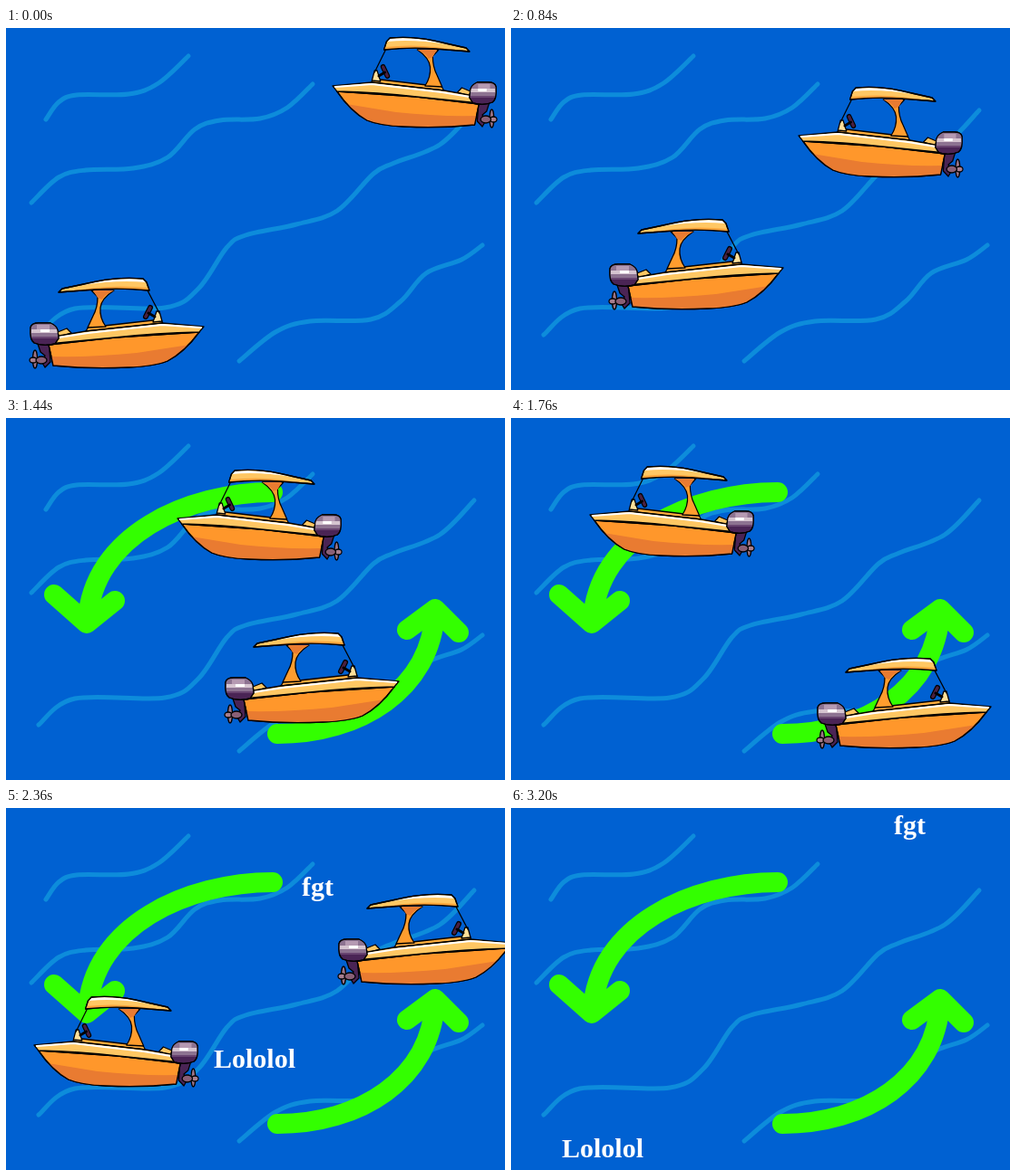
Recreate the animation shown at these times as an HTML page with a canvas. Size 550 by 400 pixels, loop 3.24 s.

```html
<!DOCTYPE html>
<html lang="en">
<head>
<meta charset="utf-8">
<title>Two boats</title>
<style>
html, body { margin: 0; width: 100%; height: 100%; overflow: hidden; background: #0061d2; }
canvas { display: block; width: 550px; height: 400px; }
</style>
</head>
<body>
<canvas id="stage" width="550" height="400"></canvas>
<script>
const ctx = document.getElementById('stage').getContext('2d');
const LOOP = 3240, STEP = 40;

const waves = [
  [44,101, 58,82, 78,74, 135,73, 168,61, 201,31],
  [28,193, 58,165, 88,157, 140,155, 178,143, 208,112, 236,102, 280,100, 310,88, 338,62],
  [36,339, 76,310, 175,309, 212,288, 243,243, 264,229, 320,217, 365,202, 405,161, 428,149, 478,129, 516,91],
  [257,368, 297,336, 335,324, 402,322, 435,302, 463,271, 502,256, 525,240]
];

// Offsets from the starting place: [time, x, y]
const rightPath = [
  [0,0,0], [1120,109,-87], [1600,267,-17], [1680,290,-12], [1760,311,-11],
  [1880,321,-41], [2120,320,-123], [2240,331,-157], [2600,375,-264],
  [2760,394,-312], [3200,448,-442]
];
const leftPath = [
  [0,0,0], [1120,-58,73], [1600,-226,36], [1680,-250,37], [1760,-273,43],
  [1920,-304,89], [2120,-320,153], [2240,-324,181], [2600,-349,256],
  [2760,-362,294], [3200,-402,425]
];

const hullLow = new Path2D('M47 350 L52 373 Q92 377 134 375 Q163 374 178 368 Q197 358 213 336 L120 342 Z');
const hullShade = new Path2D('M50 363 Q95 364 144 359 L202 350 Q191 362 177 368 Q163 374 134 375 Q92 377 52 373 Z');
const rim = new Path2D('M47 349 L53 341 L88 335 L172 326 L218 330 L213 336 Q165 337 120 342 Z');
const coaming = new Path2D('M88 335 L91 330 L108 329 L171 322 L173 327 Z');
const pillar = new Path2D('M94 290 L101 297 Q101 309 96 318 L90 331 L110 330 Q103 320 104 309 Q105 299 119 290 Z');
const pillarShade = new Path2D('M96 290 L119 290 Q108 295 106 300 L101 298 Z');
const roof = new Path2D('M58 292 L62 288 L100 280 Q124 275 151 277 L155 281 L158 290 Q128 287 97 289 Z');
const roofGlow = new Path2D('M84 284 Q121 275 151 278 L154 281 Q124 278 84 284 Z');
const roofEdge = new Path2D('M59 292 L98 287 Q126 284 157 287 L158 290 Q128 287 97 289 Z');
const cowl = new Path2D('M27 331 Q28 326 36 326 L49 326 Q56 329 57 334 L58 343 L54 349 Q41 352 31 348 Q26 345 27 331 Z');
const leg = new Path2D('M35 349 L52 348 L48 357 L49 369 L43 375 L40 370 L43 362 L38 358 Z');

function fill(shape, color, line = true) {
  ctx.fillStyle = color;
  ctx.fill(shape);
  if (line) ctx.stroke(shape);
}

function stroke(d, color, width) {
  ctx.strokeStyle = color;
  ctx.lineWidth = width;
  ctx.stroke(new Path2D(d));
}

function box(x, y, w, h, color) {
  ctx.fillStyle = color;
  ctx.fillRect(x, y, w, h);
}

function oval(x, y, rx, ry, color) {
  const p = new Path2D();
  p.ellipse(x, y, rx, ry, 0, 0, Math.PI * 2);
  fill(p, color);
}

// Drawn facing right, where it begins at the lower left
function boat() {
  ctx.lineJoin = ctx.lineCap = 'round';
  ctx.strokeStyle = '#000';
  ctx.lineWidth = 1.3;
  fill(new Path2D('M57 336 L67 332 L72 337 L58 341 Z'), '#ffc763');
  fill(leg, '#4a2455');
  oval(32, 366, 2.5, 10, '#9c7486');
  oval(30, 367, 4, 3, '#a87f8e');
  oval(39, 367, 6, 4, '#8a6076');

  fill(hullLow, '#ff972b');
  fill(hullShade, '#e97b31', false);
  ctx.stroke(hullLow);
  fill(coaming, '#ffad3d');
  fill(rim, '#ffc763');
  stroke('M58 342 L90 337 L172 328 L215 331', '#fff', 2);
  stroke('M88 335 L172 326', '#000', 1.2);

  ctx.lineWidth = 1.3;
  fill(pillar, '#ff9d2e');
  fill(pillarShade, '#e97b31', false);
  fill(new Path2D('M162 325 L166 313 L169 313 L172 324 Z'), '#ffe09a');
  stroke('M156 290 L169 315', '#000', 1.3);
  ctx.lineWidth = 1.3;
  fill(roof, '#ffc763');
  fill(roofEdge, '#ffa53a', false);
  fill(roofGlow, '#fff', false);
  ctx.stroke(roof);

  stroke('M154 319 L159 309', '#000', 6);
  stroke('M154 319 L159 309', '#4a2040', 3.5);
  stroke('M157 315 L164 319', '#000', 3);

  ctx.strokeStyle = '#000';
  ctx.lineWidth = 1.3;
  fill(cowl, '#4a2455');
  ctx.save();
  ctx.clip(cowl);
  box(26, 326, 32, 15, '#8d7391');
  box(28, 333, 29, 4, '#d5c4d0');
  box(34, 328, 14, 5, '#b59ab2');
  box(38, 333, 10, 3, '#fff');
  box(26, 341, 32, 2, '#684470');
  ctx.restore();
  ctx.stroke(cowl);
}

// Smooth run through keyed points, with tangents taken from the neighbours
function along(path, t) {
  let i = 0;
  while (i < path.length - 2 && t >= path[i + 1][0]) i++;
  const a = path[i], b = path[i + 1], d = b[0] - a[0], u = (t - a[0]) / d;
  if (i === 0) return [1, 2].map(k => Math.round(b[k] * u));
  const p = i > 1 ? path[i - 1] : a, n = path[i + 2] || b;
  return [1, 2].map(k => {
    const ma = (b[k] - p[k]) / (b[0] - p[0]) * d;
    const mb = (n[k] - a[k]) / (n[0] - a[0]) * d;
    const v = 1 - u;
    return Math.round(a[k] * (1 + 2 * u) * v * v + ma * u * v * v
      + b[k] * u * u * (3 - 2 * u) - mb * u * u * v);
  });
}

function wave(p) {
  const at = i => {
    const k = Math.max(0, Math.min(p.length / 2 - 1, i)) * 2;
    return [p[k], p[k + 1]];
  };
  ctx.beginPath();
  ctx.moveTo(p[0], p[1]);
  for (let i = 0; i < p.length / 2 - 1; i++) {
    const [a, b, c, d] = [at(i - 1), at(i), at(i + 1), at(i + 2)];
    ctx.bezierCurveTo(b[0] + (c[0] - a[0]) / 6, b[1] + (c[1] - a[1]) / 6,
      c[0] - (d[0] - b[0]) / 6, c[1] - (d[1] - b[1]) / 6, c[0], c[1]);
  }
  ctx.stroke();
}

function label(text, x, y, dx, dy, u) {
  ctx.fillText(text, Math.round(x + dx * u), Math.round(y + dy * u));
}

function draw(t) {
  box(0, 0, 550, 400, '#0061d2');
  ctx.lineCap = ctx.lineJoin = 'round';
  ctx.strokeStyle = '#0d8cdb';
  ctx.lineWidth = 5;
  waves.forEach(wave);

  if (t > 1120) {
    stroke('M294 82 C200 82 95 130 90 224 M53 195 L89 227 L120 202', '#33ff00', 22);
    stroke('M299 349 C390 349 468 300 473 214 M442 234 L473 211 L499 237', '#33ff00', 22);
  }

  if (t >= 2280) {
    const u = (t - 2640) / 560;
    ctx.font = 'bold 30px "Liberation Serif", "Times New Roman", serif';
    ctx.fillStyle = '#fff';
    label('fgt', 358, 74, 64, -45, u);
    label('Lololol', 171, 320, -115, 66, u);
  }

  // Both boats rest for one step as they leave the arrows
  const s = t <= 2240 ? t : t - STEP;
  const [rx, ry] = along(rightPath, s), [lx, ly] = along(leftPath, s);
  ctx.save();
  ctx.translate(rx, ry);
  boat();
  ctx.restore();
  ctx.save();
  ctx.translate(360 + lx, ly - 266);
  ctx.scale(-0.943, 1);
  ctx.translate(-218, 0);
  boat();
  ctx.restore();
}

function tick() {
  draw(Math.floor(performance.now() % LOOP / STEP) * STEP);
  requestAnimationFrame(tick);
}
tick();
</script>
</body>
</html>
```
